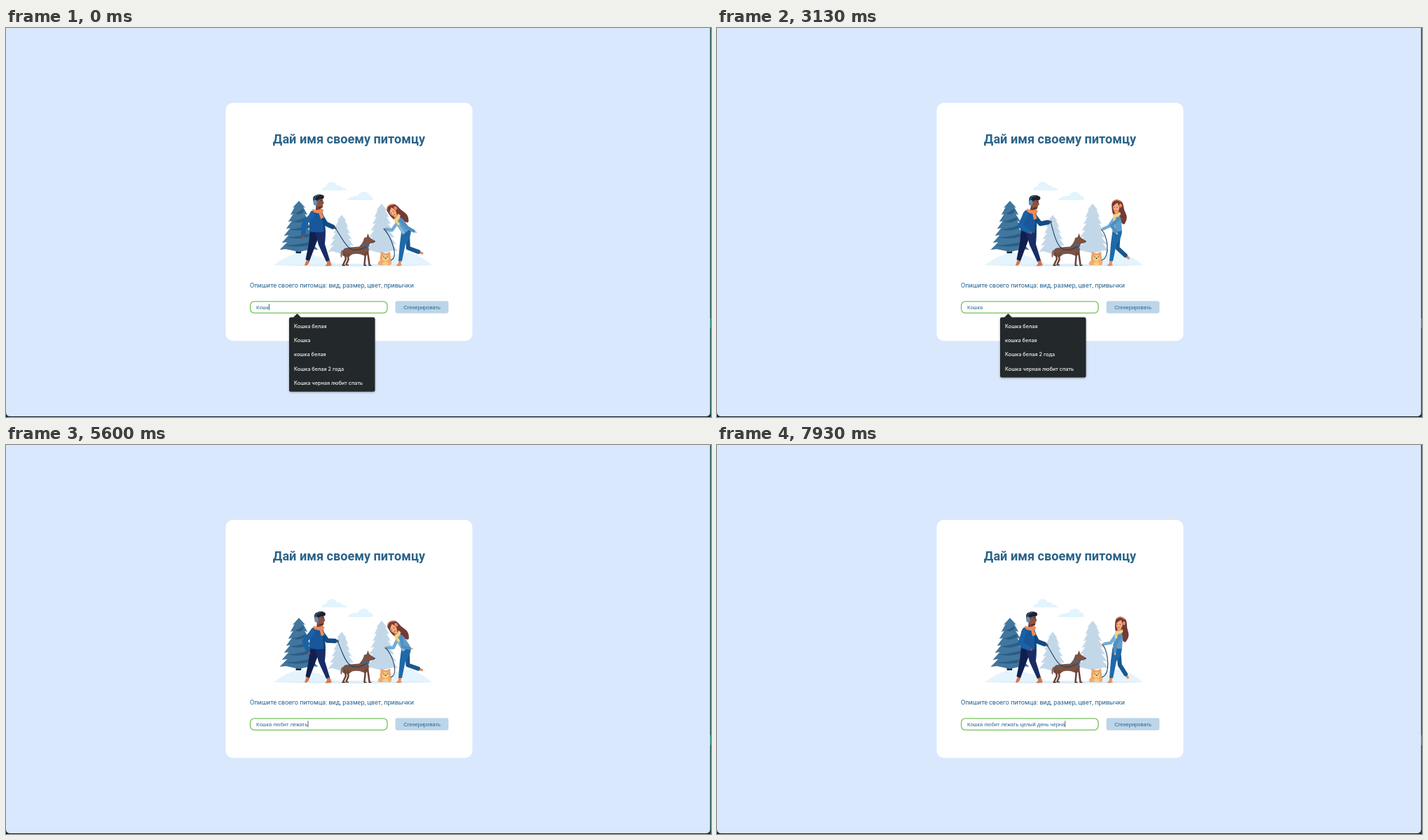
Recreate the animation shown at these times as an HTML page. Size 1006 by 556 pixels, loop 8000 ms.

```html
<!DOCTYPE html>
<html lang="ru">
<head>
<meta charset="utf-8">
<title>Дай имя своему питомцу</title>
<style>
html, body { margin: 0; width: 100%; height: 100%; overflow: hidden; background: #10202a; }
svg { display: block; }
text { white-space: pre; }
.page { font-family: Roboto, sans-serif; fill: #23618f; }
.field { font: 7.545px "Liberation Sans", Arial, sans-serif; fill: #2c6690; }
.popup { font: 500 7.3px Inter, sans-serif; fill: #f1f2f2; }
.limb { fill: none; stroke-linejoin: round; stroke-linecap: round; }
.leash { fill: none; stroke: #1d3f63; stroke-width: 1.1; }
</style>
</head>
<body>
<svg width="1006" height="556" viewBox="0 0 1006 556">
  <rect x="1004" width="2" height="556" fill="#0f4a4c"/>
  <rect x="1004" y="415" width="2" height="14" fill="#1f8a6c"/>
  <path d="M0 0H1004.7V549Q1004.7 555 998.7 555H6Q0 555 0 549Z" fill="#d9e8fc"/>
  <rect x="313.5" y="107" width="352" height="340.3" rx="10" fill="#fff"/>
  <text class="page" x="489.5" y="165" text-anchor="middle" font-size="18.1" font-weight="700" style="fill:#2b6389">Дай имя своему питомцу</text>

  <g fill="#e2f4fd">
    <path d="M451 232Q452 227 457 227Q459 220 464 220Q470 220 472 225Q477 224 479 228Q485 228 487 232Z"/>
    <path d="M487 246Q489 241 496 241Q499 239 502 240Q505 234 511 234Q516 234 518 239Q523 239 524 246Z"/>
  </g>
  <g fill="#e5f3fc">
    <path d="M382 339Q400 325 420 321Q448 324 474 339Z"/>
    <path d="M530 339Q555 319 577 321Q594 327 608 339Z"/>
    <path d="M381 339Q495 335 609 339Q500 343 381 339Z" fill="#dceefa"/>
  </g>
  <g id="trees"></g>

  <g id="man">
    <g id="manFar"></g>
    <path d="M429 331L433.5 333L431 338Q428 341 426 339Z M457.5 331L462 331L463.5 336L465 339Q460 341 455.5 340L458 337Z" fill="#d3774f"/>
    <path d="M434 288H448L444 304L433 333L427.5 331L432 308Z" fill="#101f4d"/>
    <path d="M440 288H456Q456 300 455 309L462 332L457 334L446 310Z" fill="#182c66"/>
    <g id="manTop">
      <path d="M433 268Q434 261 440 260H450Q453 264 454 272L456 291Q445 293 433 291Z" fill="#17579a"/>
      <path d="M449 263Q453 270 453 291L456 291 454 270Z" fill="#104578"/>
      <path d="M443 254H450V263H442Z" fill="#754132"/>
      <path d="M441 243L452 242L453 247L454.5 250.5L453 252L452.3 256.5Q446 259 442 253Z" fill="#8b5341"/>
      <path d="M447 256L452.5 254.8L452 257Q449 258.5 446 257Z" fill="#4d2e2a"/>
      <path d="M440 250Q437 241 442 239.5Q448 236 454 239.5Q456 243 452.5 244.5Q447 244.5 445 247L443 252Z" fill="#20222e"/>
      <path d="M449.5 246.4h2.6v.7h-2.6z" fill="#20222e"/>
      <path d="M441.5 249Q439 239.5 448 239" fill="none" stroke="#37658f" stroke-width="1.3"/>
      <ellipse cx="442" cy="249.5" rx="2.8" ry="4" fill="#5e91ba"/>
      <path d="M438 258.5Q445 262 451 257.5L454 261Q452 264 451 264L454 271L449.5 273L447 265Q440 264.5 438 262Z" fill="#ef8a5a"/>
    </g>
    <g id="manNear"></g>
  </g>

  <g id="dog" fill="#7b5243">
    <path d="M479.5 325Q479 317 484 314.5Q495 313 504 312.5Q510 307 511 300L514.5 299L516.5 293.5L518.5 299L526.5 304.5Q526.5 307.5 519.5 308L517 313Q519 318 516 324L512 326Q503 321 494 323.5L488 328Z"/>
    <path class="limb" d="M483 322L485 330L481 338.5M488 323L488.5 331L485.5 338M513 322L511.5 338M516 320L518.5 338" stroke="#6a4438" stroke-width="2.5"/>
    <path class="limb" d="M480 318Q477.5 322 478.5 327" stroke="#6a4438" stroke-width="1.3"/>
    <path d="M479.5 340v-1.6h4.5v1.6zM485 339.6v-1.6h4v1.6zM510.5 340v-1.6h4v1.6zM517.5 340v-1.6h4v1.6z" fill="#5c392f"/>
    <path class="limb" d="M510.5 309Q513 312 517.5 311.5" stroke="#2a70ae" stroke-width="2.2"/>
    <circle cx="525.8" cy="305" r=".9" fill="#292329"/>
  </g>

  <g id="spitz">
    <path d="M533 333Q529 336 532 339H549Q552 333 548 328L536 327Z" fill="#f0ac70"/>
    <path d="M535 319.5L540 322H543L548 319.5L549 329Q546 335 541.5 335Q536 335 533.5 330Z" fill="#eda269"/>
    <ellipse cx="541.5" cy="329" rx="5" ry="4.6" fill="#f7cd83"/>
    <ellipse cx="541.5" cy="336.5" rx="4" ry="2.6" fill="#f7cd83"/>
    <path d="M538.5 326.5h1.2v1.2h-1.2zM543.5 326.5h1.2v1.2h-1.2zM540.7 328.6h1.8v1.4h-1.8z" fill="#4b302c"/>
  </g>

  <g id="woman">
    <g id="kick"></g>
    <path d="M560 331L564.5 332L563.5 337L565 339Q561 341 556.5 339.5L560 336Z" fill="#e58f62"/>
    <path d="M564.5 289H578Q578 300 570 309L565 333L560 333L562 308Z" fill="#1f69a9"/>
    <g id="womanFar"></g>
    <g id="womanTop">
      <path d="M568 250Q570 245 576 245.5Q583 247 584 254Q584 261 586 266Q589 274 583 281Q580 283 578 277Q576 272 575 268L569 268Q566 262 568 250Z" fill="#733b36"/>
      <path d="M566.5 271Q571 266 576 268Q579 271 578.5 279L578 291H565Z" fill="#5f9dcb"/>
      <path d="M566.5 271L565 291H569Q569 280 570.5 268Z" fill="#82b7dc"/>
      <path d="M571 260H576V268H570Z" fill="#e28a61"/>
      <path d="M569 251Q573 247 578 251Q579.5 260 573.5 264.5Q568 263 569 251Z" fill="#f5ab7c"/>
      <path d="M568 256Q567 247 575 246Q582 247 581 261Q577.5 256 576 250Q571 252 568 256Z" fill="#733b36"/>
      <path d="M569 248.5Q574 243 581 249" fill="none" stroke="#ef8a5a" stroke-width="1.4"/>
      <ellipse cx="580" cy="254.5" rx="2" ry="2.8" fill="#ef8a5a"/>
      <path d="M570 255.8h1.2v1h-1.2zM574 255.8h1.2v1h-1.2z" fill="#4b302c"/>
      <path d="M571 260.5Q572.5 262 574.5 260.5" fill="none" stroke="#c4463c" stroke-width=".8"/>
      <path d="M567.5 265Q573 267.5 578 263L579 267Q575 271 571 270.5L571 277L567.5 276Z" fill="#f4d281"/>
    </g>
    <g id="womanNear"></g>
  </g>
  <path id="manLeash" class="leash"/>
  <path id="womanLeash" class="leash"/>

  <text class="page" x="348" y="370.8" font-size="9.055">Опишите своего питомца: вид, размер, цвет, привычки</text>
  <rect x="348.6" y="390.9" width="195.4" height="16.4" rx="5.5" fill="#fff" stroke="#74c159" stroke-width="1.3"/>
  <text id="typed" class="field" x="357" y="401.5"></text>
  <rect id="caret" y="394.3" width=".8" height="9" fill="#1d3f5c"/>
  <rect x="555.6" y="390.2" width="75.8" height="17.6" rx="3" fill="#bcd5e8"/>
  <text class="field" x="593.5" y="401.5" text-anchor="middle">Сгенерировать</text>
  <g id="popup" style="filter:drop-shadow(0 1px 1.5px #0005)">
    <path d="M410 414L414.5 409Q415.5 408 416.5 409L421 414Z" fill="#23282a"/>
    <rect id="popupBox" x="404" y="413.4" width="122.5" rx="2.5" fill="#23282a"/>
    <g id="options"></g>
  </g>
</svg>
<script>
const LOOP = 8000, FRAME = 200 / 3, STRIDE = 6000;
const PHRASE = 'Кошка любит лежать целый день черна';
const OPTIONS = ['Кошка белая', 'Кошка', 'кошка белая', 'Кошка белая 2 года', 'Кошка черная любит спать'];
// time, characters typed
const TYPING = [[0, 4], [200, 5], [530, 6], [3200, 7], [4000, 10], [4870, 13], [6330, 23], [7930, 35], [8000, 35]];
// time, lean, leash hand x y, free hand x y
const MAN = [
  [0, -1, 470, 286, 424, 299], [330, -1, 470, 286, 421, 298], [670, 1, 470, 286, 424, 299],
  [2000, 3, 471, 286, 450, 292], [4000, 12, 480, 270, 446, 293], [4870, 6, 479, 270, 448, 295]];
// time, lean, leash hand x y, free hand x y, raised foot x y
const WOMAN = [
  [0, -38, 539, 287, 585, 292, 594, 322], [330, -34, 541, 286, 584, 293, 594, 322],
  [670, -13, 547, 283, 567, 297, 592, 325], [2000, 2, 550, 285, 568, 299, 586, 333],
  [4000, -13, 547, 291, 573, 290, 588, 326], [4870, -34, 544, 295, 570, 290, 593, 321]];
for (const keys of [MAN, WOMAN]) keys.push([STRIDE, ...keys[0].slice(1)]);

const $ = id => document.getElementById(id);
function add(parent, tag, attrs) {
  const el = document.createElementNS('http://www.w3.org/2000/svg', tag);
  for (const k in attrs) el.setAttribute(k, attrs[k]);
  return parent.appendChild(el);
}

function sample(keys, t) {
  const i = Math.max(1, keys.findIndex(k => k[0] > t));
  const a = keys[i - 1], b = keys[i], u = (t - a[0]) / (b[0] - a[0]);
  return a.slice(1).map((v, j) => v + (b[j + 1] - v) * u);
}

function rotate([x, y], [cx, cy], deg) {
  const r = deg * Math.PI / 180, c = Math.cos(r), s = Math.sin(r);
  return [cx + (x - cx) * c - (y - cy) * s, cy + (x - cx) * s + (y - cy) * c];
}

// Joint of a limb made of two bones of equal length
function joint([ax, ay], [bx, by], bone, side) {
  const dx = bx - ax, dy = by - ay, d = Math.hypot(dx, dy);
  const h = side * Math.sqrt(Math.max(0, bone * bone - d * d / 4)) / d;
  return [(ax + bx) / 2 - dy * h, (ay + by) / 2 + dx * h];
}

function limb(id, color, width, skin, bone, side) {
  const g = $(id);
  const bare = add(g, 'path', { class: 'limb', stroke: skin, 'stroke-width': width * .55 });
  const cloth = add(g, 'path', { class: 'limb', stroke: color, 'stroke-width': width });
  return (from, to) => {
    const mid = joint(from, to, bone, side);
    const cuff = mid.map((v, i) => v + (to[i] - v) * .72);
    bare.setAttribute('d', `M${mid}L${to}`);
    cloth.setAttribute('d', `M${from}L${mid}L${cuff}`);
  };
}

function tree(x, top, bottom, w, n, fill) {
  const left = [], right = [];
  for (let i = 1; i <= n; i++) {
    const y = top + (bottom - top) * i / n, h = w * (.22 + .78 * i / n);
    left.push([x - h, y], [x - h * .68, y - 1]);
    right.unshift([x + h * .68, y - 1], [x + h, y]);
  }
  add($('trees'), 'path', { d: `M${x} ${top}L${left.join(' ')}L${x} ${bottom + 3}L${right.join(' ')}Z`, fill });
}
tree(479, 267, 320, 19.5, 6, '#c2d8e9');
tree(536, 251, 319, 23.5, 7, '#c2d8e9');
add($('trees'), 'path', { d: 'M414 314H422L421 322H413.5Z', fill: '#172a4c' });
tree(418, 247, 317, 27.5, 7, '#41769e');
for (let i = 1; i < 6; i++) {
  const y = 253 + i * 11.5, h = 2 + i * 3.8;
  add($('trees'), 'path', {
    d: `M${418 - h} ${y}Q416 ${y} ${418 + h} ${y - 6}L${419 + h} ${y - 2}Q418 ${y + 5} ${418 - h} ${y}Z`, fill: '#2c5e85'
  });
}
const rows = OPTIONS.map(label => {
  const row = add($('options'), 'text', { class: 'popup', x: 411 });
  row.textContent = label;
  return row;
});

const manFar = limb('manFar', '#124b86', 6.5, '#8b5341', 15, 1);
const manNear = limb('manNear', '#1b61a5', 7, '#8b5341', 18, 1);
const womanFar = limb('womanFar', '#72acd6', 4.5, '#f5ab7c', 12, -1);
const womanNear = limb('womanNear', '#4f8fc0', 4.5, '#f5ab7c', 14, 1);
const kick = limb('kick', '#18588f', 6, '#e58f62', 21.5, 1);

function pose(t) {
  const hip = [444, 290], [lean, hx, hy, bx, by] = sample(MAN, t);
  $('manTop').setAttribute('transform', `rotate(${lean} ${hip})`);
  manFar(rotate([449, 267], hip, lean), [hx, hy]);
  manNear(rotate([437, 267], hip, lean), [bx, by]);
  $('manLeash').setAttribute('d', `M${hx} ${hy}C484 306 488 328 515 312`);

  const waist = [572, 291], [tilt, lx, ly, fx, fy, kx, ky] = sample(WOMAN, t);
  $('womanTop').setAttribute('transform', `rotate(${tilt} ${waist})`);
  womanFar(rotate([568, 273], waist, tilt), [lx, ly]);
  womanNear(rotate([575, 273], waist, tilt), [fx, fy]);
  kick([573, 293], [kx, ky]);
  $('womanLeash').setAttribute('d', `M${lx} ${ly}C${lx + 9} 295 562 328 549 332`);
}

function form(t) {
  const n = Math.floor(sample(TYPING, t)[0]);
  const idle = n === 6 && (t - 530) % 1000 >= 500;
  $('typed').textContent = PHRASE.slice(0, n);
  $('caret').setAttribute('x', 357.2 + $('typed').getComputedTextLength());
  $('caret').style.display = idle ? 'none' : '';

  $('popup').style.display = n > 6 ? 'none' : '';
  let shown = 0;
  rows.forEach((row, i) => {
    const match = n < 6 || i !== 1;
    row.style.display = match ? '' : 'none';
    if (match) row.setAttribute('y', 428.5 + 20.35 * shown++);
  });
  $('popupBox').setAttribute('height', 4.6 + 20.35 * shown);
}

function draw(now) {
  const step = Math.min(119, Math.floor((now % LOOP + 4) / FRAME));
  const t = Math.round(step * FRAME / 10) * 10;
  pose(t % STRIDE);
  form(t);
  requestAnimationFrame(draw);
}
draw(0);
</script>
</body>
</html>
```
